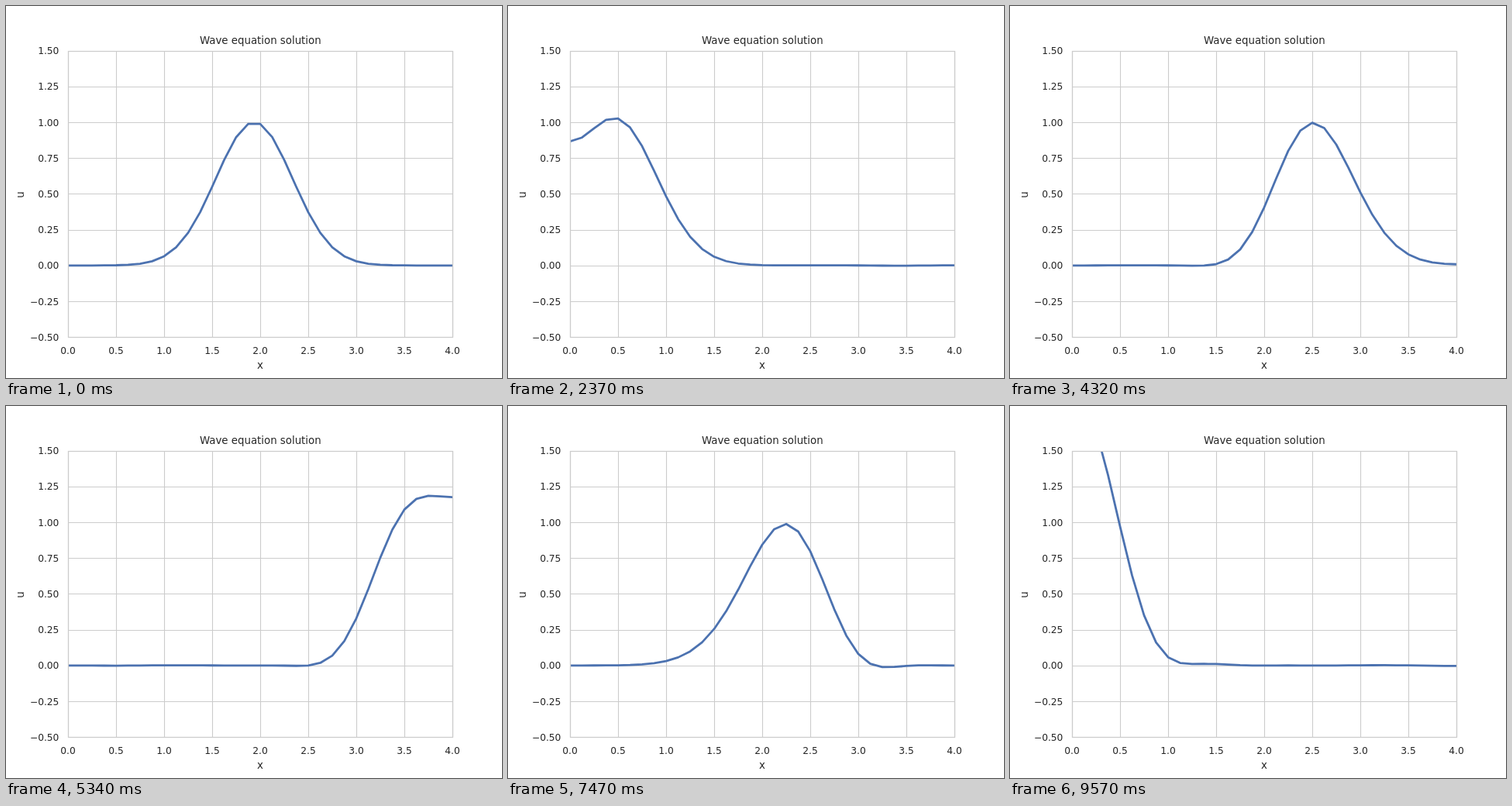
An HTML page that plays this animation: 640 px wide and 480 px high, repeating every 9600 ms.

```html
<!DOCTYPE html>
<html lang="en">
<head>
<meta charset="utf-8">
<title>Wave equation solution</title>
<style>
  html, body { margin: 0; width: 100%; height: 100%; overflow: hidden; background: #fff; }
  svg { display: block; width: 640px; height: 480px; }
  text { font-family: "DejaVu Sans", sans-serif; font-size: 13.333px; fill: #262626; text-anchor: middle; }
  .tick { font-size: 12.222px; }
  .right { text-anchor: end; }
  .grid { fill: none; stroke: #ccc; stroke-width: 1.11; }
  .frame { fill: none; stroke: #ccc; stroke-width: 1.25; }
  .wave { fill: none; stroke: #4c72b0; stroke-width: 2.78; stroke-linejoin: round; stroke-linecap: round; }
</style>
</head>
<body>
<svg id="chart" viewBox="0 0 640 480">
  <clipPath id="area"><rect x="80" y="58" width="496" height="369"/></clipPath>
</svg>
<script>
const svg = document.getElementById('chart');
const STEP_MS = 30, FRAMES = 320;
const CELLS = 32, DX = 4 / CELLS, COURANT = 0.25, SIGMA = 0.4, LEAD = 2;

const px = x => 80 + 124 * x;
const py = u => 334.8 - 184.8 * u;
const snap = v => Math.floor(v + 0.5) + 0.5;

function add(tag, attrs, text) {
  const el = document.createElementNS('http://www.w3.org/2000/svg', tag);
  for (const key in attrs) el.setAttribute(key, attrs[key]);
  if (text) el.textContent = text;
  return svg.appendChild(el);
}

function drawAxes() {
  let grid = '';
  for (let i = 0; i <= 8; i++) {
    const xv = i * 0.5, uv = -0.5 + i * 0.25;
    const x = px(xv), y = py(uv);
    grid += `M${snap(x)} 58V427.5M80 ${snap(y)}H576`;
    add('text', { class: 'tick', x, y: 449 }, xv.toFixed(1));
    add('text', { class: 'tick right', x: 68.4, y: Math.round(y + 4.6) },
      uv.toFixed(2).replace('-', '\u2212'));
  }
  add('path', { class: 'grid', d: grid });
  add('text', { x: 328.3, y: 49 }, 'Wave equation solution');
  add('text', { x: 328, y: 468 }, 'x');
  add('text', { transform: 'translate(23 243.5) rotate(-90)' }, 'u');
}

// Leapfrog solution of u_tt = u_xx with reflecting ends; the pulse starts leftwards.
function solve() {
  const pulse = c => Array.from({ length: CELLS + 1 },
    (_, i) => Math.exp(-((i * DX - c) ** 2) / (2 * SIGMA * SIGMA)));
  let prev = pulse(2 + COURANT * DX), cur = pulse(2);
  const states = [cur];
  while (states.length < FRAMES + LEAD) {
    const next = cur.map((u, i) => {
      const left = cur[i ? i - 1 : 1];
      const right = cur[i < CELLS ? i + 1 : CELLS - 1];
      return 2 * u - prev[i] + COURANT * COURANT * (left - 2 * u + right);
    });
    prev = cur;
    cur = next;
    states.push(cur);
  }
  return states.slice(LEAD);
}

drawAxes();
const states = solve();
const wave = add('polyline', { class: 'wave', 'clip-path': 'url(#area)' });
add('rect', { class: 'frame', x: 80.5, y: 58.5, width: 496, height: 369 });

function render(ms) {
  const state = states[Math.floor(ms / STEP_MS) % FRAMES];
  wave.setAttribute('points',
    state.map((u, i) => px(i * DX) + ',' + py(u).toFixed(3)).join(' '));
}

const start = performance.now();
function tick() {
  render(performance.now() - start);
  requestAnimationFrame(tick);
}
tick();
</script>
</body>
</html>
```
